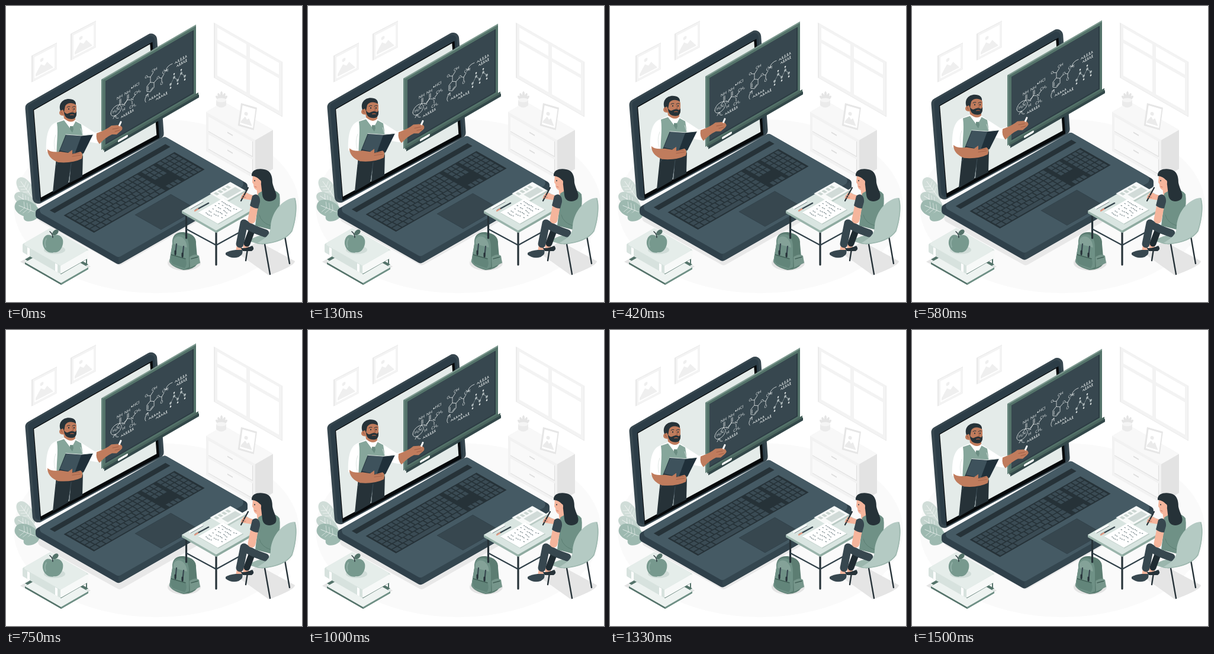
An HTML page with a canvas that plays this animation: 500x500 px, repeating every 1.54 s.

```html
<!DOCTYPE html>
<html lang="en">
<head>
<meta charset="utf-8">
<title>Online lesson</title>
<style>
html, body { margin: 0; width: 100%; height: 100%; overflow: hidden; background: #fff; }
canvas { display: block; width: 100vw; height: 100vh; }
</style>
</head>
<body>
<canvas id="stage" width="500" height="500"></canvas>
<script>
const ctx = document.getElementById('stage').getContext('2d');
const LOOP = 1540, RISE = 9.6, SLOPE = .572;
const NIGHT = '#263238', SLATE = '#37474f', STEEL = '#455a64', CHALK = '#e4e9e9';
const GREEN = '#6f9186', DEEP = '#54736a', PALE = '#86a69b', MIST = '#b4cac3';
const BROWN = '#c07c5d', UMBER = '#96563f', PEACH = '#f5b59c';

function fill(color, d) {
  ctx.fillStyle = color;
  ctx.fill(new Path2D(d));
}
function line(color, width, d) {
  ctx.strokeStyle = color;
  ctx.lineWidth = width;
  ctx.stroke(new Path2D(d));
}
function dot(color, x, y, rx, ry = rx) {
  ctx.fillStyle = color;
  ctx.beginPath();
  ctx.ellipse(x, y, rx, ry, 0, 0, Math.PI * 2);
  ctx.fill();
}
function rect(color, x, y, w, h) {
  ctx.fillStyle = color;
  ctx.fillRect(x, y, w, h);
}
function poly(color, points, radius = 0) {
  const last = points[points.length - 1];
  ctx.beginPath();
  ctx.moveTo((last[0] + points[0][0]) / 2, (last[1] + points[0][1]) / 2);
  points.forEach((p, i) => ctx.arcTo(...p, ...points[(i + 1) % points.length], radius));
  ctx.closePath();
  ctx.fillStyle = color;
  ctx.fill();
}

// Draws on a slanted plane given by its origin and two edge vectors.
function plane(x, y, ux, uy, vx, vy, paint) {
  ctx.save();
  ctx.transform(ux, uy, vx, vy, x, y);
  paint();
  ctx.restore();
}
const wall = (x, y, slope, paint) => plane(x, y, 1, slope, 0, 1, paint);
const topOf = (x, y, a, b, paint) => plane(x, y, a, -a * SLOPE, b, b * SLOPE, paint);

// Isometric box; x, y is the left corner of its top, a runs to the back, b to the front.
function box(x, y, a, b, h, top, left, right, radius = 0) {
  const at = (u, v, drop = 0) => [x + a * u + b * v, y + (b * v - a * u) * SLOPE + drop];
  poly(left, [at(0, 0), at(1, 0), at(1, 1), at(1, 1, h), at(0, 1, h), at(0, 0, h)], radius);
  poly(right, [at(0, 1), at(1, 1), at(1, 1, h), at(0, 1, h)], radius / 2);
  poly(top, [at(0, 0), at(1, 0), at(1, 1), at(0, 1)], radius);
}

function seeded(seed) {
  return () => (seed = (seed * 16807) % 2147483647) / 2147483647;
}

function leaf(color, x, y, length, width, angle, vein) {
  ctx.save();
  ctx.translate(x, y);
  ctx.rotate(angle);
  fill(color, `M0 0C${length * .2} ${-width} ${length} ${-width} ${length} 0 ${length} ${width} ${length * .2} ${width} 0 0Z`);
  if (vein) {
    line(vein, .8, `M0 0H${length * .85}`);
    for (let i = 3; i < 6; i++) line(vein, .6, `M${length * i / 8} 0l5 ${-width * .5}m-5 ${width * .5}l5 ${width * .5}`);
  }
  ctx.restore();
}

function mountains(color, x, y, w, h) {
  fill(color, `M${x} ${y + h}V${y + h * .85}L${x + w * .3} ${y + h * .4} ${x + w * .5} ${y + h * .6} ${x + w * .65} ${y + h * .45} ${x + w} ${y + h}Z`);
  dot(color, x + w * .35, y + h * .15, 3);
}

function wallPicture(x, y) {
  wall(x, y, -.52, () => {
    rect('#e8e8e8', 0, 0, 43, 45);
    rect('#f3f3f3', 2, 1, 41, 44);
    rect('#fff', 5, 5, 34, 36);
    mountains('#efefef', 7, 12, 30, 27);
  });
}

function windowFrame() {
  wall(351, 28, .573, () => {
    rect('#eaeaea', 0, 0, 116, 93);
    rect('#f3f3f3', 2, 0, 113, 92);
    for (const x of [6, 61]) {
      rect('#fff', x, 5, 49, 20);
      rect('#fff', x, 31, 49, 55);
    }
  });
}

function dresser() {
  box(338, 179, 30, 83, 66, '#f8f8f8', '#f2f2f2', '#e3e3e3');
  wall(338, 179, SLOPE, () => {
    for (const y of [5, 35]) {
      rect('#dedede', 4, y, 75, 26);
      rect('#f9f9f9', 4, y, 74, 25);
      rect('#dcdcdc', 36, y + 8, 9, 2);
    }
  });
  for (let i = -2; i <= 2; i++) leaf('#e5e5e5', 364, 162, 18 - Math.abs(i) * 2, 3, -Math.PI / 2 + i * .38);
  fill('#ebebeb', 'M355 159H372V168Q364 175 355 168Z');
  dot('#f5f5f5', 363.5, 159, 8.5, 3.5);
  plane(397, 164, 1, .29, -.14, 1, () => {
    rect('#e6e6e6', 0, 0, 27, 38);
    rect('#fff', 3, 3, 22, 32);
    mountains('#ebebeb', 4, 12, 19, 20);
  });
}

function plant() {
  leaf('#d0ddd8', 48, 328, 46, 15, -2.2, '#f4f7f6');
  leaf('#c3d4ce', 52, 340, 43, 14, -2.6, '#f4f7f6');
  leaf('#9db9b0', 58, 352, 46, 18, -2.75, '#e6eeeb');
  leaf('#9db9b0', 57, 352, 28, 10, 2.9);
}

// The unit square is the top of the base, x along the hinge and y to the front.
function keyboard() {
  rect(NIGHT, .07, .22, .866, .37);
  const row = (i, from, to, count) => {
    const step = (to - from) / count;
    for (let k = 0; k < count; k++) rect('#3a4b54', from + k * step, .233 + i * .059, step - .008, .048);
  };
  for (let i = 0; i < 6; i++) {
    if (i < 5) row(i, .082, .645, 15 - Math.max(0, i - 2));
    else { row(i, .082, .22, 3); row(i, .22, .44, 1); row(i, .44, .645, 4); }
    if (i < 3 || i === 5) row(i, .67, .77, 3);
    row(i, .79, .93, 4);
  }
}

function laptop() {
  const lid = [[32, 167], [254, 40], [267, 221], [46, 340]];
  const inset = (left, top, right, bottom) => {
    const at = (u, v) => [0, 1].map(i =>
      (lid[0][i] * (1 - u) + lid[1][i] * u) * (1 - v) + (lid[3][i] * (1 - u) + lid[2][i] * u) * v);
    return [at(left, top), at(right, top), at(right, bottom), at(left, bottom)];
  };
  poly(SLATE, lid, 10);
  poly('#2c3d47', inset(.022, .02, .98, .98), 7);
  poly('#06090b', inset(.057, .09, .965, .987));
  poly('#e4ebe9', inset(.062, .098, .946, .948));

  box(50, 345, 218, 140, 12, STEEL, '#2f404a', '#34464f', 7);
  topOf(52, 345, 216, 138, () => {
    rect(NIGHT, .05, .08, .905, .06);
    keyboard();
    rect('#2f3f48', .352, .648, .282, .322);
    rect(SLATE, .355, .652, .276, .314);
  });
}

function label(text, x, y, size = 6.5) {
  ctx.font = size + 'px Lato, sans-serif';
  ctx.textAlign = 'center';
  ctx.textBaseline = 'middle';
  ctx.fillStyle = CHALK;
  ctx.fillText(text, x, y);
}
function scrawl(x, y, width, seed) {
  const random = seeded(seed), letters = Math.round(width / 4);
  ctx.beginPath();
  for (let i = 0; i < letters; i++) {
    const tall = 1 + random() * 1.6;
    for (let a = 0; a < Math.PI * 2; a += .4) {
      ctx.lineTo(x + (i + a / 6.28) * width / letters + 1.3 * Math.sin(a), y + tall * Math.cos(a));
    }
  }
  ctx.strokeStyle = CHALK;
  ctx.lineWidth = .7;
  ctx.stroke();
}

function formulas() {
  for (const x of [31, 44]) {
    label('NH', x, 47);
    line(CHALK, .7, `M${x} 51V59M${x + 2} 51V58M${x} 59l-5 4M${x} 59l5 3`);
  }
  label('•HCl', 57, 43);
  label('CH₃', 61, 56);
  label('CH₃', 53, 75);
  label('N', 52, 63);
  label('N', 38, 64);
  label('H', 38, 72);
  label('H₂N', 25, 66);
  line(CHALK, .7, 'M40 63 44 59M54 61 58 58M52 66V71M16 66a9 8 0 1 1 18 0a9 8 0 1 1-18 0M29 81Q24 80 23 74M20 77 23 73 26 77');

  const ring = Array.from({ length: 6 }, (_, i) => {
    const a = i * Math.PI / 3 - Math.PI / 2;
    return [83 + 7 * Math.cos(a), 60 + 8 * Math.sin(a)];
  });
  line(CHALK, .7, 'M' + ring.join('L') + 'ZM83 52V43L78 40M83 43 88 38M89 56 94 53M98 53 102 56 106 51M102 56V62M79 57V63M83 66 87 63');
  label('O', 76, 39, 6);
  label('OH', 90, 35, 6);
  label('O', 96, 52, 6);
  label('O', 102, 65, 6);
  label('CH₃', 108, 48, 6);
  line(CHALK, .7, 'M75 81Q71 74 79 69M75 70 79 69 79 74M120 42Q111 40 109 47M106 44 109 48 113 47');

  for (let i = 0; i < 5; i++) {
    const x = 117 + 6 * i, side = i % 2 ? -1 : 1, y = 71 + 4 * side;
    line('#8f9c9f', .8, `M${x} ${y}v${6 * side}` + (i < 4 ? `M${x} ${y}l6 ${-8 * side}` : ''));
    dot('#aeb9bb', x, y, 1.9);
    dot(CHALK, x, y + 6 * side, 1.3);
  }
  [[33, 82, 22], [80, 80, 20], [92, 86, 20], [124, 43, 21], [127, 50, 18]]
    .forEach(([x, y, width], i) => scrawl(x, y, width, 71 + i));
}

function blackboard() {
  wall(161, 125, -.579, () => {
    rect(DEEP, 0, 0, 160, 118);
    rect('#7d998f', 0, -1, 160, 2.5);
    rect('#64837a', 0, 0, 3, 118);
    rect('#2c3b43', 7, 6, 149, 107);
    rect(SLATE, 7, 6, 147, 105);
    rect('#4a655e', 3, 116, 161, 5);
    rect('#33484a', 5, 120, 160, 5);
    line('#fff', 4, 'M30 120H43');
    formulas();
  });
}

function teacher() {
  fill(NIGHT, 'M85 257 130 250 129 288 107 299 109 275 105 300 79 315Q82 284 85 257Z');
  line('#42545d', .8, 'M110 266 106 297M88 263 84 270');
  fill('#fff', 'M86 196C72 200 67 218 68 246L87 247 90 258 130 251 131 228 155 232 163 211 150 214 116 192 98 191Z');
  fill(PALE, 'M86 197 98 193 110 209 116 194 127 200Q132 225 130 253 105 265 86 259C84 238 89 216 86 197Z');
  fill('#fff', 'M97 189 111 207 118 194 113 189Z');
  fill('#6b8d82', 'M108 203 113 203 114 208 112 214 108 208Z');
  line('#d8e1de', .8, 'M84 218Q79 231 83 243M126 207 131 222');

  fill(BROWN, 'M97 182H117V192Q110 200 98 190Z');
  fill(BROWN, 'M95 171C96 158 118 157 119 170V184C116 193 103 192 98 185 88 187 88 176 95 175Z');
  fill(NIGHT, 'M92 177C88 166 95 157 106 157 114 157 119 161 118 167 111 162 103 164 100 169L98 179 96 175Z');
  fill(NIGHT, 'M98 178Q102 184 106 181 112 178 117 181L119 178C120 188 116 191 111 191 103 191 98 187 98 178Z');
  line(UMBER, 1.6, 'M109 184Q112 183 114 184');
  for (const x of [106, 115]) {
    dot(NIGHT, x, 174, 1, 1.3);
    line(NIGHT, 1, `M${x - 3} 171q3 -2 5 -1`);
  }
  line(UMBER, 1, 'M112 173 114 178 111 179M93 178 95 182');

  fill('#20303a', 'M89 247 101 217 127 219 147 217 131 249 108 254Z');
  fill('#3e525c', 'M91 244 102 217 127 220 116 250Z');
  line('#dce5e2', 1, 'M101 217 127 219 147 217');
  fill(BROWN, 'M70 242Q76 248 92 246L105 248 112 243 112 250 126 246Q131 249 128 258 112 266 88 264 70 257 70 242Z');
  line(UMBER, .7, 'M112 250 124 249M112 254 126 252');

  fill(BROWN, 'M153 215Q170 209 178 202L192 201Q200 206 194 211L187 217 179 217Q168 222 158 233 151 226 153 215Z');
  line('#fff', 3, 'M190 205 194 196');
  fill(BROWN, 'M178 203 190 202 196 206 194 211 184 211Z');
  line(UMBER, .8, 'M180 208 190 206M184 212 192 210');
}

function books() {
  poly('#e4e4e4', [[24, 432], [78, 402], [143, 440], [94, 471]]);
  box(32, 428, 46, 61, 6, DEEP, '#eef3f1', '#e3ebe8');
  box(32, 433, 46, 61, 3, '#eef3f1', DEEP, GREEN);
  line(DEEP, 2, 'M93 452 136 427V435');
  box(28, 402, 47, 64, 14, '#e5edea', '#d7e2de', '#f7f9f8', 3);
  wall(28, 402, SLOPE, () => [8, 55].forEach(x => rect('#fff', x, 1, 4, 13)));

  dot('#d0dcd8', 82, 412, 18, 7);
  fill('#77998e', 'M78 389C69 382 61 391 62 402 64 414 75 419 81 416 91 418 98 405 96 395 93 386 85 385 78 389Z');
  line('#8fada4', 2, 'M68 393Q64 400 67 407');
  line(NIGHT, 1.5, 'M79 391Q79 385 74 381');
  leaf(DEEP, 78, 387, 13, 5, -.7);
}

function backpack() {
  dot('#e4e4e4', 301, 434, 28, 13);
  fill('#5c7d72', 'M281 402C280 387 288 381 300 382 314 384 322 390 321 402L324 435Q316 446 300 446 280 441 276 432Z');
  fill(GREEN, 'M281 402C281 389 288 384 299 386Q309 390 309 409V441L301 445Q280 440 276 432Z');
  fill('#84a298', 'M283 396C286 385 304 386 306 408L283 402Z');
  fill('#62857a', 'M279 420 303 427Q307 435 302 443L282 436Q276 430 279 420Z');
  fill('#76968b', 'M310 424Q320 417 326 422L328 434 311 442Z');
  for (const [x, y] of [[288, 402], [300, 406]]) {
    line(SLATE, 2.2, `M${x} ${y}l-2 19`);
    line(NIGHT, 3, `M${x - 2} ${y + 12}v5`);
  }
  line('#436158', 1.4, 'M279 420 303 427M313 427 324 424');
}

function desk() {
  line(NIGHT, 3.2, 'M304.5 353V392M355 381V437');
  line('#314149', 2.2, 'M305 377 355 404 404 377');
  box(297, 346, 82, 58, 4, '#d9e5e1', '#9ab4ab', '#8eaaa0');
  topOf(297, 346, 82, 58, () => {
    const random = seeded(29);
    rect('#b9cac4', .6, 0, .42, .45);
    rect('#f8faf9', .6, -.03, .42, .43);
    rect('#d1dbd8', .7, .17, .28, .18);
    for (let i = 0; i < 4; i++) rect('#cbd6d2', .64 + i * .08, .02, .05, .1);
    rect('#bdcdc7', .13, .31, .52, .57);
    rect('#fff', .14, .28, .51, .57);
    for (let row = 0; row < 6; row++) {
      for (let v = .34; v < .78; v += .05) {
        if (random() > .3) rect('#78878b', .19 + row * .075 + random() * .02, v, .014, .035);
      }
    }
  });
  line('#fff', 3.5, 'M311 341 331 330');
  line('#7b898c', 1, 'M312 343 333 331');
  line(SLATE, 2.5, 'M320 345 342 333');
  line('#e49b84', 2.5, 'M319 346 324 343');
}

function student() {
  fill('#e5e5e5', 'M395 420 425 397 488 431Q488 439 444 455Z');
  line(NIGHT, 2.4, 'M410 398 405 430M471 389 479 435M437 402 446 453');
  fill('#9bb6ad', 'M410 397Q420 387 448 385L453 396Q440 403 426 402Z');

  line(PEACH, 9, 'M406 400 405 408M395 402 393 412');
  fill(NIGHT, 'M396 408Q402 411 416 405 421 410 415 414L400 414Z');
  fill(SLATE, 'M371 417Q377 413 388 412L399 412Q402 419 393 424 381 428 371 420Z');
  line('#202c32', 11, 'M436 384 416 377 407 401');
  line(SLATE, 13, 'M438 384Q414 376 402 367L395 402');

  fill(PEACH, 'M401 316Q406 314 411 318L422 321V329L396 325Z');
  line(NIGHT, 2.2, 'M397 329 409 307');
  line('#c9806a', 1, 'M398 321 404 320M399 324 405 323');
  fill(PEACH, 'M423 306H438L437 321 425 322Z');
  fill(GREEN, 'M426 317C438 307 455 308 462 318 465 338 459 361 448 378L421 371 424 347Z');
  line('#5c7f73', 1, 'M428 353Q431 366 447 371');
  line(PEACH, 13, 'M420 336 415 361');
  fill(SLATE, 'M416 321C423 314 430 321 429 331L426 342Q418 342 412 337Z');

  fill(PEACH, 'M417 286H433L434 306Q430 316 424 311 418 309 418 301L416 298Z');
  fill(NIGHT, 'M415 287C414 276 427 274 436 276 449 278 450 291 450 298 452 310 460 318 455 326 447 333 434 331 433 319L431 302 429 294Q424 288 415 287Z');
  dot(PEACH, 428.5, 298, 2.5, 4);
  dot(NIGHT, 420, 295, .8, 1.2);
  line('#c9725f', .9, 'M420 305 423 306');

  fill(MIST, 'M487 324C470 325 449 345 447 372 447 387 437 393 425 400 441 405 473 396 483 381 490 365 494 330 487 324Z');
  line('#9bb6ad', 1.5, 'M488 325Q493 348 483 380 470 399 432 402');
}

// Rises and sinks at an even pace, lowest just before the loop restarts.
function lift(t) {
  const phase = ((t + 40) % LOOP) / LOOP;
  return RISE * (1 - Math.abs(2 * phase - 1)) - .5;
}

function draw(time) {
  rect('#fff', 0, 0, 500, 500);
  ctx.lineCap = ctx.lineJoin = 'round';
  dot('#fafafa', 254, 338, 241, 147);
  wallPicture(43, 84);
  wallPicture(109, 47);
  windowFrame();
  dresser();
  plant();
  poly('#e8e8e8', [[46, 358], [260, 235], [404, 318], [192, 439]], 8);
  ctx.save();
  ctx.translate(0, -lift(time));
  laptop();
  blackboard();
  teacher();
  ctx.restore();
  books();
  backpack();
  desk();
  student();
}

const start = performance.now();
function tick() {
  draw(performance.now() - start);
  requestAnimationFrame(tick);
}
tick();
</script>
</body>
</html>
```
